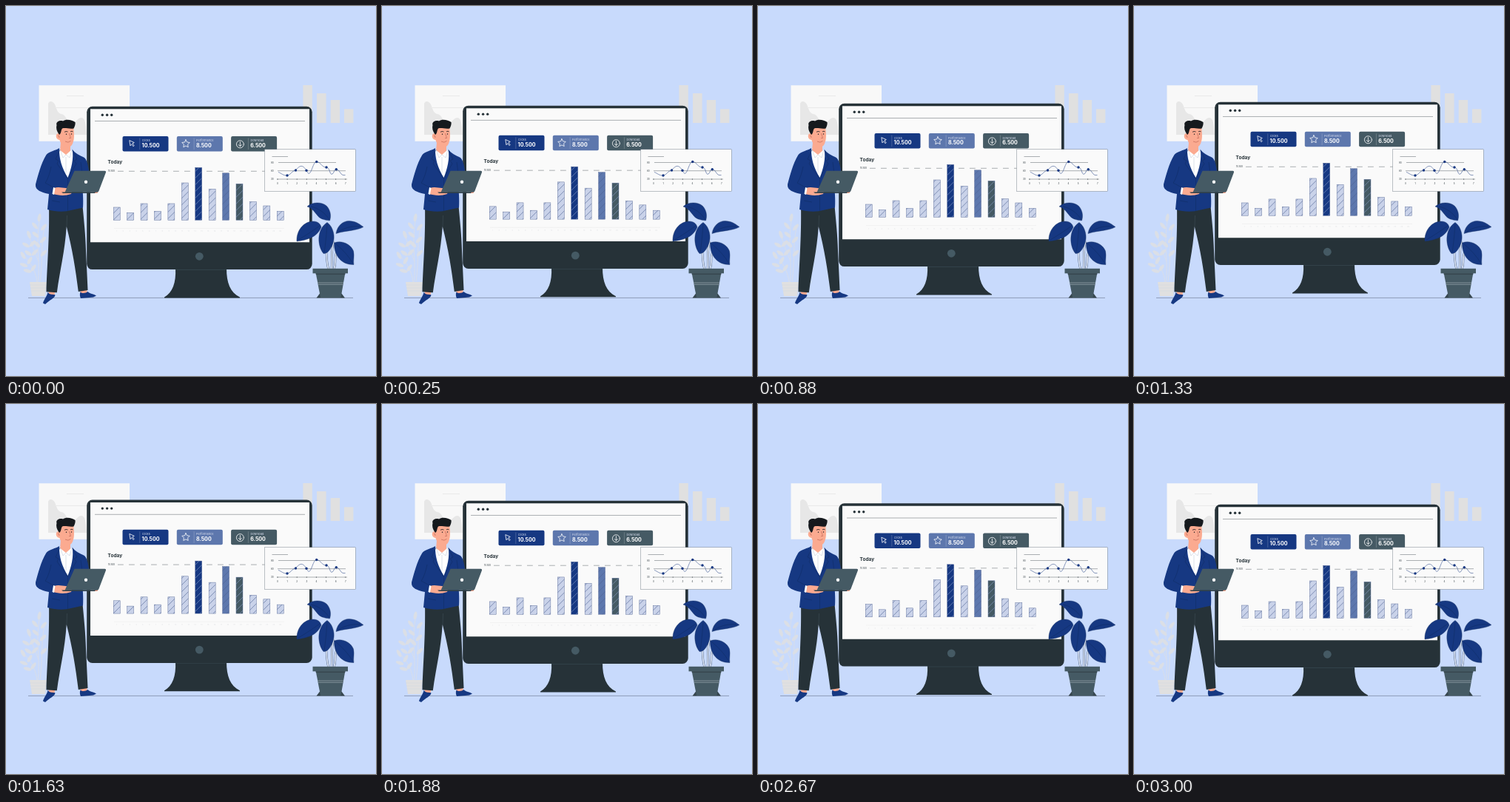
An HTML page that plays this animation: 500 by 500 pixels, repeating every 3.04 s.

```html
<!DOCTYPE html>
<html lang="en">
<head>
<meta charset="utf-8">
<title>Dashboard</title>
<style>
  html, body { margin: 0; width: 100%; height: 100%; overflow: hidden; background: #c8dafc; }
  svg { display: block; width: 100vw; height: 100vh; }
  text { font-family: Inter, "Open Sans", sans-serif; }
  .blue { fill: #163882; }
  .mid { fill: #5d77ad; }
  .slate { fill: #455a64; }
  .dark { fill: #263238; }
  .pale { fill: #c9d2e9; }
  .paper { fill: #fafafa; }
  .grey { fill: #e0e0e0; }
  .skin { fill: #fbaa90; }
  .hair { fill: #15191d; }
  .line { fill: none; stroke: #263238; stroke-width: .38; }
  .white { fill: none; stroke: #fff; stroke-width: .8; stroke-linejoin: round; stroke-linecap: round; }
  .leaf { fill: #163882; stroke: #1b3360; stroke-width: .4; }
  .fold { fill: none; stroke: #0f2a60; stroke-width: .5; }
  #monitor { animation: float 3040ms linear infinite; }
  @keyframes float {
    0%, 98.68%, 100% { transform: translateY(0); }
    49.34% { transform: translateY(-6.8px); }
  }
</style>
</head>
<body>
<svg viewBox="0 0 500 500">
  <defs>
    <pattern id="hatch" width="9" height="9" patternUnits="userSpaceOnUse" x="145" y="289.300">
      <path d="M0 9L9 0" stroke="#4c6090" stroke-width=".6"/>
    </pattern>
    <pattern id="hatchLight" width="9" height="9" patternUnits="userSpaceOnUse" x="145" y="289.300">
      <path d="M0 9L9 0" stroke="#8fa3cc" stroke-width=".6"/>
    </pattern>
  </defs>

  <!-- Backdrop -->
  <rect x="44.500" y="107.200" width="122.500" height="75.600" fill="#f8f8f8"/>
  <path d="M82 121.500H105M68 137.500H136" stroke="#e6e6e6" stroke-width=".8"/>
  <path d="M57 174V132C58 127.500 64 128 66.500 134C69 141 70 145 75 146C82 147 81 157 88 158C95 159 96 151 102 151C107 151 108 160 109 174Z" fill="#e7e7e7"/>
  <g class="grey">
    <rect x="401.400" y="107" width="12.400" height="51"/>
    <rect x="420" y="118" width="12.600" height="40"/>
    <rect x="438.700" y="127" width="12.400" height="31"/>
    <rect x="457" y="139.300" width="12.400" height="18.700"/>
  </g>
  <g id="fern" fill="#dbdfe6">
    <path d="M43 374C47 350 39 318 46 285M42 374C41 362 36 350 25 338M44 345C38 332 34 320 31 309M46 372C50 345 47 320 52 300" fill="none" stroke="#dbdfe6" stroke-width=".8"/>
    <path d="M32 373H55L53 392H35Z" fill="#e0e0e0"/>
    <path d="M32 377H55M33 381H55M34 385H54" stroke="#cfd4dc" stroke-width=".5"/>
  </g>
  <path d="M30 394.400H469" stroke="#66738a" stroke-width=".6"/>

  <g id="monitor">
    <path class="dark" d="M229 355H298C298 374 303 387 316 393.500V394.500H214V393.500C225 387 230 374 229 355Z"/>
    <path d="M229 356.300H298" stroke="#455a64" stroke-width=".5"/>
    <rect class="dark" x="109.200" y="135.800" width="304.500" height="220.300" rx="7.500"/>
    <path class="paper" d="M114 139.300H410V319.200H114Z"/>
    <circle class="slate" cx="261.300" cy="338.300" r="5.400"/>
    <g class="dark">
      <circle cx="130.300" cy="147.300" r="1.700"/>
      <circle cx="136.600" cy="147.300" r="1.700"/>
      <circle cx="142.700" cy="147.300" r="1.700"/>
    </g>
    <path class="line" d="M120 155.500H404"/>
    <g id="tiles"></g>
    <path class="white" d="M167.200 181.800L173.300 184.600L170.900 185.700L173.200 188.700L171.900 189.700L169.700 186.700L168.200 188.600Z"/>
    <path class="white" d="M243 180.700L244.600 184L248.200 184.500L245.600 187.100L246.200 190.700L243 189L239.800 190.700L240.400 187.100L237.800 184.500L241.400 184Z"/>
    <path class="white" d="M321.400 186.800A5 5 0 1 1 311.400 186.800A5 5 0 1 1 321.400 186.800M316.400 183.700V189.500M314.200 187.500L316.400 189.700L318.600 187.500"/>
    <text class="dark" x="137.600" y="213.500" font-size="6.500" font-weight="700">Today</text>
    <text class="dark" x="138" y="224.300" font-size="2.900">10.500</text>
    <path class="line" d="M151 223.300H384" stroke-dasharray="7.800 7.200"/>
    <g id="bars"></g>
    <path d="M146 300.500H376" stroke="#ececec" stroke-width=".6"/>
    <g id="days" fill="#dfe1e4" font-size="2.500" text-anchor="middle"></g>
  </g>

  <!-- Line chart card -->
  <rect class="paper" x="349.500" y="193.800" width="122.800" height="56.700" stroke="#5c6875" stroke-width=".4"/>
  <path class="line" d="M359.500 203.500H381M368 211.500H446M367 222.700H459M366 234H461"/>
  <path fill="none" stroke="#35518f" stroke-width=".6" d="M368 224.500C372 226 375 229.500 380 229C385 228.500 386 222.500 391.500 222C397 215 401 214 406 222.300C412 236 414 210 419.700 210.500C426 211 426 218 433 218C438 218 437 229 441 227C444 225 443 220.500 446.300 220.800C452 221 451 230 458.500 228.500"/>
  <g id="points" class="blue"></g>
  <g id="scale" class="dark" font-size="2.900" text-anchor="middle"></g>

  <!-- Potted plant -->
  <g fill="none">
    <path stroke="#40536e" stroke-width="2.500" d="M436 356C432 345 434 330 431 312M440 356C441 340 439 330 443 318M443 356C447 346 443 340 447 332"/>
    <path stroke="#dbe5f8" stroke-width="1.700" d="M436 356C432 345 434 330 431 312M440 356C441 340 439 330 443 318M443 356C447 346 443 340 447 332"/>
  </g>
  <g class="leaf">
    <path d="M407 271C413 265 426 264 433 270C438 275 440 283 437.500 290C430 289 424 288 420 282C416 277 413 273 407 271Z"/>
    <path d="M446 307.500C448 295 458 288.500 468 291C475 292 479 296 483 298.500C474 304 460 303 446 307.500Z"/>
    <path d="M443.500 320C454 316 466 322 469.500 331C471 338 469 344 470 349.500C454 350 443 338 443.500 320Z"/>
    <path d="M393 318C392 304 402 291 415 291C422 291 425 295 426 299C420 313 407 316 393 318Z"/>
    <path d="M434 292.500C442 298 446 312 441 323C438 330 434 335 429 334.500C421 325 419 302 434 292.500Z"/>
  </g>
  <path class="fold" d="M412 271C422 273 432 280 437 289M448 306C458 299 468 297 479 298M445 321C455 329 463 338 469 348M395 316C407 309 417 302 424 297M434 295C433 308 432 321 430 333"/>
  <path d="M424 388.500H453.500L458 394.500H419.500Z" fill="#37474f"/>
  <path class="slate" d="M418.500 360H458.500L452.500 394H425Z"/>
  <path d="M418.500 361.300H458.500L458.200 363H418.800Z" fill="#37474f"/>
  <rect class="slate" x="414.500" y="354.800" width="47.500" height="6.500"/>
  <path d="M421 374H456M421.500 376.300H455.500" stroke="#a9b5bd" stroke-width=".6"/>

  <!-- Presenter -->
  <path class="skin" d="M58 384H67L65 392H57ZM100 382H109L110 389H101Z"/>
  <path class="blue" d="M56.500 387C60 391 63 389 66.500 390.500C66 395 59 397 53 403L50 401.500C51 397 55 393 56.500 387Z"/>
  <path class="blue" d="M100.500 386.500C104 389.500 108 387.500 110.500 386C113 389 119 389 122 391.500L118 393.500L101 395Q99 391 100.500 386.500Z"/>
  <path class="dark" d="M58 270H103.500C105.500 292 107.500 310 108 330L110.500 384L97.800 386C94 356 90 330 81.800 298C79.500 332 73 356 68.800 387.300L54.500 386.300C55 358 59 315 58 270Z"/>
  <path d="M82 299L82.500 283" stroke="#43525b" stroke-width=".5"/>
  <path class="skin" d="M74 184H87V198L82 204L73 196Z"/>
  <path d="M72 194L81 201L89 194L92 206L89 235H77Z" fill="#fff"/>
  <path d="M73 194L77 205L81 201L86 205L89 195M81 204V225" fill="none" stroke="#b7c1d2" stroke-width=".5"/>
  <path class="blue" d="M72 192C67 195.500 59 196 54.500 201C47 213 43 230 40 241C39 249 48 252 58 254L56 275C65 278 75 278 82 277.300L104 272.500C105 260 103 250 104 240L113 232C112 223 111 209 106 205C100 202 93 199 89.500 193.500C92 206 88 221 83.500 232C76 220 71 205 72 192Z"/>
  <path class="fold" d="M73 194L67 207L71 209L69 213L83 233M90 195L96 207L92 209L95 213L83.500 233V277M61 217C59 227 56 235 53 239L64 245M101 211L103 226M62 263L73 265"/>
  <path class="skin" d="M65 246C71 244 76 246 81 246L90 249L88 254C80 257 70 256 64 254Z"/>
  <path d="M64 245L66.500 246L65 255L62.500 254Z" fill="#fff"/>
  <path class="skin" d="M119 248H125.500L123.500 253H119Z"/>
  <path class="slate" d="M92.500 222.800H133.500Q135.500 222.800 135 224.800L125.500 249.800Q124.800 251.700 122.800 251.700H79.500Z"/>
  <path d="M75 251.500H121L120 253H77Z" fill="#2e3f48"/>
  <circle cx="108" cy="237.800" r="2.200" fill="#fff"/>
  <path class="skin" d="M71 163H91C92 172 93 179 90 186C88 191 82 193 78 189C75 187 73 184 72.500 181C67 181 66 172 71 172Z"/>
  <path class="hair" d="M72 174C70 171 67 167 68.500 161C67 157 72 154 77 155.500C81 152 90 154 93.500 157C94 160 93 163 91.500 165.500C85 166.500 80 164 76 165.500C74 168 75 172 72 174Z"/>
  <g class="hair">
    <circle cx="81.500" cy="173.300" r=".7"/>
    <circle cx="88.500" cy="173" r=".7"/>
  </g>
  <path d="M79 170.300Q81 168.800 83.500 170M87 169.800Q89 168.700 90.500 169.800" fill="none" stroke="#15191d" stroke-width=".8"/>
  <path d="M85.500 172L87.500 178.500H85M80 183Q84 185.500 87.500 182.500M70 175Q72 175 72 178" fill="none" stroke="#b95f50" stroke-width=".6"/>
</svg>
<script>
  const add = (id, markup) => document.getElementById(id).insertAdjacentHTML("beforeend", markup);

  // Summary tiles
  [["blue", "Clicks", "10.500"], ["mid", "Performance", "8.500"], ["slate", "Download", "6.500"]]
    .forEach(([tone, label, value], i) => {
      const x = 157.5 + i * 73.3;
      add("tiles", `<rect class="${tone}" x="${x}" y="175.900" width="62" height="20.500" rx="2"/>
        <path d="M${x + 23.3} 178.500V194" stroke="#fff" stroke-opacity=".4" stroke-width=".5"/>
        <text x="${x + 26.3}" y="183.500" font-size="3.800" fill="#d5dcec">${label}</text>
        <text x="${x + 26.1}" y="191.400" font-size="7.100" font-weight="700" fill="#fff">${value}</text>`);
    });

  // Bar chart
  const tones = { 6: "blue", 8: "mid", 9: "slate" };
  [17.3, 10, 22.3, 12, 22.3, 50.3, 71, 42, 63.5, 49, 24.8, 19.3, 12].forEach((h, i) => {
    const box = `x="${145.2 + i * 18.42}" y="${289.3 - h}" width="9" height="${h}"`;
    const hatch = i === 6 || i === 9 ? "hatchLight" : "hatch";
    add("bars", `<rect class="${tones[i] || "pale"}" ${box}/>
      <rect ${box} fill="url(#${hatch})" stroke="#5a6c98" stroke-width=".45"/>`);
  });
  for (let i = 0; i < 26; i++) {
    add("days", `<text x="${149.5 + i * 8.84}" y="305.500">${i + 1}</text>`);
  }

  // Line chart marks
  [[380, 229], [391.5, 222], [406, 222.3], [419.7, 210.5], [433, 218], [446.3, 220.8]]
    .forEach(([x, y]) => add("points", `<circle cx="${x}" cy="${y}" r="1.700"/>`));
  [90, 60, 30].forEach((n, i) =>
    add("scale", `<text x="359.800" y="${212.6 + i * 11.2}">${n}</text>`));
  for (let i = 0; i < 8; i++) {
    const x = 367 + i * 13.1;
    add("scale", `<circle cx="${x}" cy="234" r=".6"/><text x="${x}" y="241">${i}</text>`);
  }

  // Fern leaves: x, y, angle
  [[45, 286, 100], [39, 297, 50], [51, 299, -50], [40, 309, 40], [31, 309, 70], [27, 323, 30],
   [36, 321, -45], [39, 333, -45], [30, 334, 35], [23, 337, 60], [24, 350, 20], [32, 344, -60],
   [29, 358, 15], [37, 354, -55], [50, 316, -45], [42, 322, 45], [51, 334, -45]]
    .forEach(([x, y, a]) =>
      add("fern", `<ellipse cx="${x}" cy="${y}" rx="5.500" ry="2.300" transform="rotate(${a} ${x} ${y})"/>`));
</script>
</body>
</html>
```
